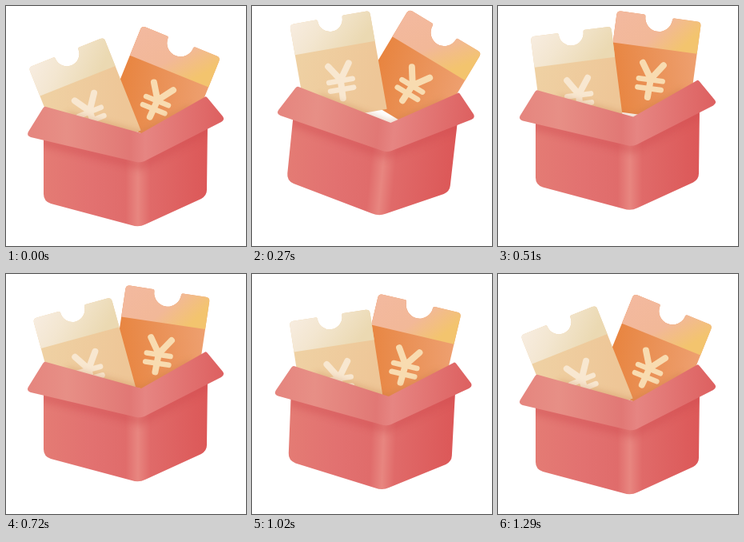
Recreate the animation shown at these times as an HTML page. Size 300 px wide and 300 px high, loop 1890 ms.

```html
<!DOCTYPE html>
<html lang="en">
<head>
<meta charset="utf-8">
<title>Coupon box</title>
<style>
  html, body { margin: 0; width: 100%; height: 100%; overflow: hidden; background: #fff; }
  svg { display: block; width: 100vw; height: 100vh; }
  .yen { fill: none; stroke-linecap: round; stroke-linejoin: round; }
</style>
</head>
<body>
<svg viewBox="0 0 300 300">
  <defs>
    <linearGradient id="creamTop" x1="0" y1="0.1" x2="1" y2="0.5">
      <stop offset="0" stop-color="#f7ecdf"/><stop offset=".4" stop-color="#f3e6d0"/><stop offset="1" stop-color="#ebd9b2"/>
    </linearGradient>
    <linearGradient id="cream" x1="0" y1="0" x2="1" y2=".6">
      <stop offset="0" stop-color="#efd3a6"/><stop offset="1" stop-color="#eec697"/>
    </linearGradient>
    <linearGradient id="orangeTop" x1="0" y1="0" x2="1" y2=".3">
      <stop offset="0" stop-color="#f3b99f"/><stop offset=".6" stop-color="#f2b898"/><stop offset="1" stop-color="#f3c46e"/>
    </linearGradient>
    <linearGradient id="orange" x1="0" y1=".6" x2="1" y2=".3">
      <stop offset="0" stop-color="#e8843f"/><stop offset=".5" stop-color="#ea9258"/><stop offset="1" stop-color="#eea070"/>
    </linearGradient>
    <linearGradient id="side" gradientUnits="userSpaceOnUse" x1="47" y1="0" x2="252" y2="0">
      <stop offset="0" stop-color="#e47b74"/><stop offset=".3" stop-color="#e27170"/>
      <stop offset=".5" stop-color="#e06c6b"/><stop offset=".575" stop-color="#e88680"/>
      <stop offset=".65" stop-color="#e06a69"/><stop offset="1" stop-color="#dc5858"/>
    </linearGradient>
    <linearGradient id="rim" gradientUnits="userSpaceOnUse" x1="27" y1="0" x2="272" y2="0">
      <stop offset="0" stop-color="#e5857e"/><stop offset=".2" stop-color="#e78f86"/>
      <stop offset=".52" stop-color="#e17875"/><stop offset=".6" stop-color="#e68582"/>
      <stop offset="1" stop-color="#dd6060"/>
    </linearGradient>
    <filter id="soft" x="-20%" y="-50%" width="140%" height="200%"><feGaussianBlur stdDeviation="4"/></filter>
    <clipPath id="sideClip"><use href="#sidePath"/></clipPath>
    <g id="yen" class="yen">
      <path stroke-width="8" d="M-12.5 60 0 79 13.5 60M0 79-1 102"/>
      <path stroke-width="6.6" d="M-15 80H15M-15 91H14.500"/>
    </g>
  </defs>

  <g id="box">
    <g id="right">
      <path class="full" fill="url(#orange)"/>
      <path class="top" fill="url(#orangeTop)"/>
      <use href="#yen" stroke="#f8dbb0"/>
    </g>
    <g id="left">
      <path class="full" fill="url(#cream)"/>
      <path class="top" fill="url(#creamTop)"/>
      <use href="#yen" stroke="#f8e7d0"/>
    </g>
    <path d="M76 136 169 161 232 126" fill="none" stroke="#b9703a" stroke-width="6" opacity=".4" filter="url(#soft)"/>
    <path id="sidePath" fill="url(#side)" d="M47 155V235Q47 244 56 247L157 274Q166 277 174 273L244 241Q251 237 251 230L252 146 168 180Z"/>
    <path clip-path="url(#sideClip)" d="M40 168 168 199 260 150" fill="none" stroke="#cf4c4f" stroke-width="12" opacity=".4" filter="url(#soft)"/>
    <path fill="url(#rim)" d="M50 126 169 159 248 114Q250 112 252 115L271 138Q274 142 269 145L173 194Q168 196 163 195L31 164Q25 162 28 157L46 128Q48 125 50 126Z"/>
  </g>
</svg>
<script>
const LOOP = 1890, STEP = 30;
const $ = id => document.getElementById(id);

// Keys: time, angle, x, y
const tracks = {
  box: [[0, 0, 0, 0], [150, 2.9, 0, -7.8], [270, 5.8, 0, -15.2], [510, 0, 0, -20.5],
        [615, -4.2, 0, -18.4], [720, 0, 0, -16], [1020, 2.3, 0, -6.8], [1290, 0, 0, 0]],
  left: [[0, -21.7, 75.3, 58], [150, -18, 79, 46], [270, -15.8, 79.8, 36], [510, -7.3, 91, 52.5],
         [720, -15.3, 82.5, 58.5], [1020, -11, 91, 60.8], [1290, -21.7, 75.3, 58]],
  right: [[0, 22, 219, 44.5], [150, 23.1, 222.9, 40.9], [270, 25.2, 225.2, 38.1], [510, 7.7, 201.5, 33.5],
          [720, 8.5, 202.5, 37.7], [1020, 11, 203.6, 41.2], [1290, 22, 219, 44.5]]
};

const secant = (k, i, c) => (k[i + 1][c] - k[i][c]) / (k[i + 1][0] - k[i][0]);

// Slope at a key, flat at turning points
function slope(k, i, c) {
  if (i === 0) return secant(k, 0, c);
  if (i === k.length - 1) return secant(k, i - 1, c);
  const a = secant(k, i - 1, c), b = secant(k, i, c);
  return a * b <= 0 ? 0 : 2 * a * b / (a + b);
}

function sample(k, t, c) {
  const last = k.length - 1;
  if (t >= k[last][0]) return k[last][c];
  let i = 0;
  while (t >= k[i + 1][0]) i++;
  const d = k[i + 1][0] - k[i][0], s = (t - k[i][0]) / d, r = 1 - s;
  return k[i][c] * r * r * (1 + 2 * s) + k[i + 1][c] * s * s * (3 - 2 * s)
    + d * s * r * (r * slope(k, i, c) - s * slope(k, i + 1, c));
}

const ticket = (w, r, h) =>
  `M${5 - w} 0H${-r - 2}Q${-r} 0 ${-r} 2A${r} ${r} 0 0 0 ${r} 2Q${r} 0 ${r + 2} 0` +
  `H${w - 5}Q${w} 0 ${w} 5V${h}H${-w}V5Q${-w} 0 ${5 - w} 0Z`;

function shape(id, w, r, fold) {
  $(id).querySelector('.full').setAttribute('d', ticket(w, r, 125));
  $(id).querySelector('.top').setAttribute('d', ticket(w, r, fold));
}
shape('left', 50.7, 15.5, 38.5);
shape('right', 53, 17, 40);

function draw(now) {
  const t = Math.floor(now % LOOP / STEP) * STEP;
  for (const id in tracks) {
    const [a, x, y] = [1, 2, 3].map(c => sample(tracks[id], t, c));
    const pivot = id === 'box' ? ' 150 203' : '';
    $(id).setAttribute('transform', `translate(${x} ${y}) rotate(${a}${pivot})`);
  }
  requestAnimationFrame(() => draw(performance.now() - start));
}
const start = performance.now();
draw(0);
</script>
</body>
</html>
```
